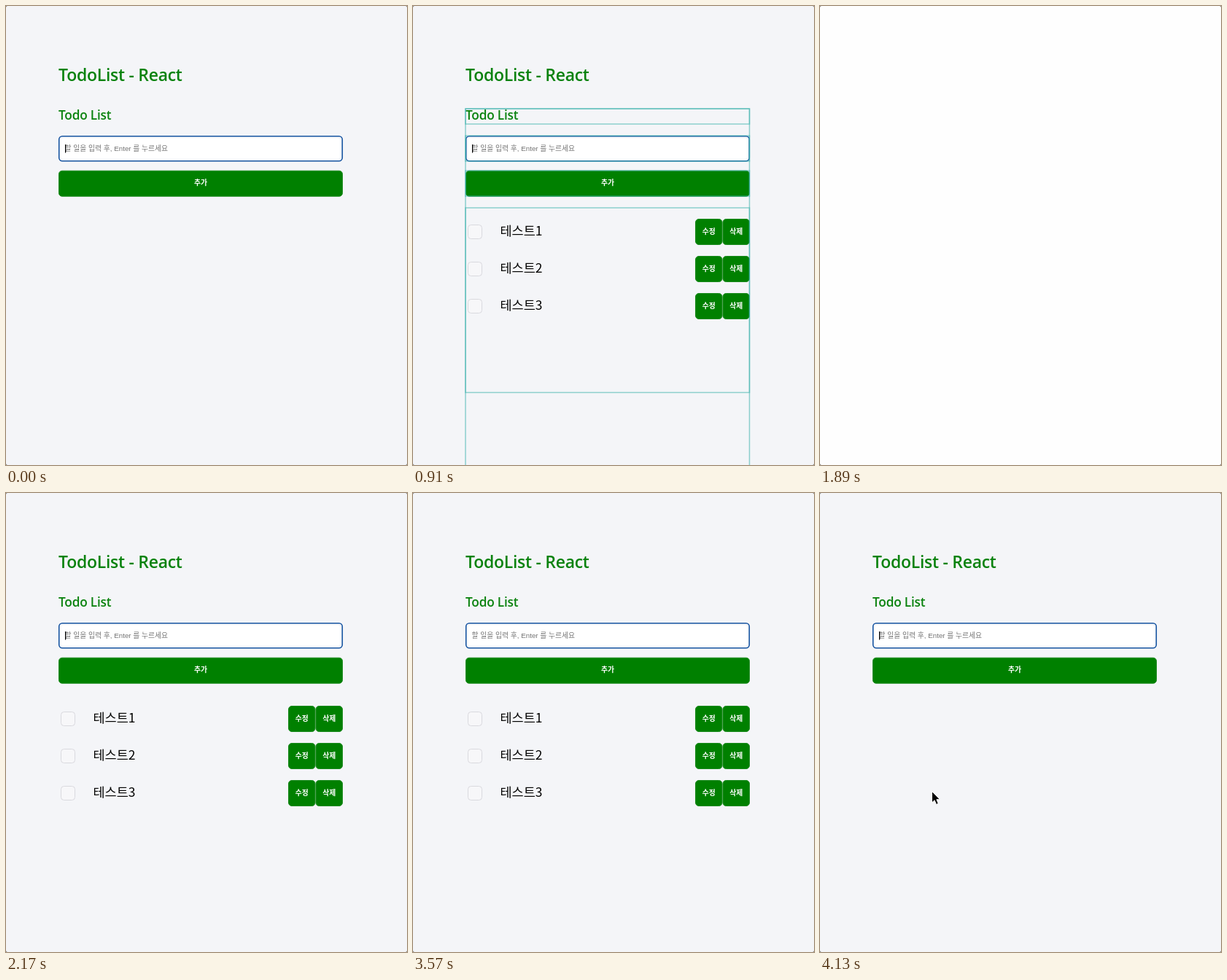
These frames come from a looping animation (550 px wide and 630 px high, 4200 ms). An HTML page:

```html
<!DOCTYPE html>
<html lang="ko">
<head>
<meta charset="utf-8">
<title>TodoList</title>
<style>
  html, body { margin: 0; width: 100%; height: 100%; overflow: hidden; background: #555; }
  svg { display: block; }
  text { font-family: "Liberation Sans", "Noto Sans CJK KR", sans-serif; }
  .title { font-family: "Open Sans", sans-serif; font-weight: 600; letter-spacing: -.012em; fill: #0a820e; }
  .label { font: 600 9.8px "Noto Sans CJK KR", sans-serif; fill: #fff; text-anchor: middle; }
  .item { font: 17.5px "Noto Sans CJK KR", sans-serif; text-shadow: 0 1px 1px #fff; }
  .hint { font-size: 9.8px; fill: #757575; }
  .button { fill: #008000; stroke: #1a8b1e; }
  .box { fill: #f7f7f9; stroke: #d9d9de; }
  #marks { fill: none; stroke-width: 1.5; stroke-opacity: .55; }
</style>
</head>
<body>
<svg width="550" height="630" viewBox="0 0 550 630">
  <rect id="back" width="550" height="630" rx="2"/>
  <g id="page">
    <text class="title" x="72" y="103" font-size="23">TodoList - React</text>
    <text class="title" x="72" y="156" font-size="17.25">Todo List</text>
    <rect x="72.75" y="178.75" width="388.5" height="34" rx="4.5" fill="#fff" stroke="#1553a0" stroke-width="1.6"/>
    <rect x="75" y="181" width="384" height="29.5" rx="3" fill="none" stroke="#f3f3f5"/>
    <text class="hint" x="80.5" y="199">할 일을 입력 후, Enter 를 누르세요</text>
    <rect id="caret" x="81" y="190" width="1.2" height="11.5"/>
    <g id="add"></g>
    <g id="list"></g>
    <g id="marks"></g>
  </g>
  <path id="pointer" d="M0 0V15.5L3.6 12.2L6 18L8.8 16.8L6.4 11.2H11Z" stroke="#fff" stroke-width="1"/>
</svg>
<script>
const LOOP = 4200;
const $ = id => document.getElementById(id);

const button = (x, y, w, label) =>
  `<rect class="button" x="${x + .5}" y="${y + .5}" width="${w - 1}" height="35" rx="4.5"/>
   <text class="label" x="${x + w / 2}" y="${y + 20.7}">${label}</text>`;

const row = n => {
  const y = 241 + 51 * n;
  return `<rect class="box" x="75.5" y="${y + 8.5}" width="19" height="19" rx="4"/>
    <text class="item" x="119.5" y="${y + 23}">테스트${n}</text>` +
    button(387, y, 37.5, '수정') + button(424.5, y, 37.5, '삭제');
};

const mark = ([y, h]) => `<rect x="72" y="${y}" width="389.5" height="${h}"/>`;

$('add').innerHTML = button(72, 225.7, 390, '추가');
$('list').innerHTML = [1, 2, 3].map(row).join('');
$('marks').innerHTML = [[141, 500], [141, 21], [178, 35], [226, 35], [277, 253.5]].map(mark).join('');

// Spans of time, in ms, in which each part is visible
const blank = [[630, 700], [1890, 1960], [3780, 3990]];
const list = [[140, 630], [910, 1890], [2170, 3780]];
const marks = [[910, 1190]];
const caret = [[0, 420], [700, 1190], [1750, 2450], [3010, 3570], [3990, LOOP]];
// Pointer stops: start time, x, y; each lasts 70 ms
const stops = [[2450, 8, 420], [2520, 30, 422], [2590, 12, 421],
               [3990, 42, 404], [4060, 105, 408], [4130, 153.5, 409.5]];

const within = (spans, t) => spans.some(([from, to]) => t >= from && t < to);
const show = (id, on) => $(id).style.display = on ? '' : 'none';

function draw(now) {
  const t = now % LOOP;
  const empty = within(blank, t);
  $('back').setAttribute('fill', empty ? '#fefefe' : '#f4f5f8');
  show('page', !empty);
  show('list', within(list, t));
  show('marks', within(marks, t));
  $('marks').setAttribute('stroke', t < 980 ? '#37afa9' : '#63b19e');
  show('caret', within(caret, t));
  const stop = stops.find(([from]) => t >= from && t < from + 70);
  show('pointer', stop);
  if (stop) $('pointer').setAttribute('transform', `translate(${stop[1]} ${stop[2]})`);
}

const start = performance.now();
(function tick() {
  draw(performance.now() - start);
  requestAnimationFrame(tick);
})();
</script>
</body>
</html>
```
